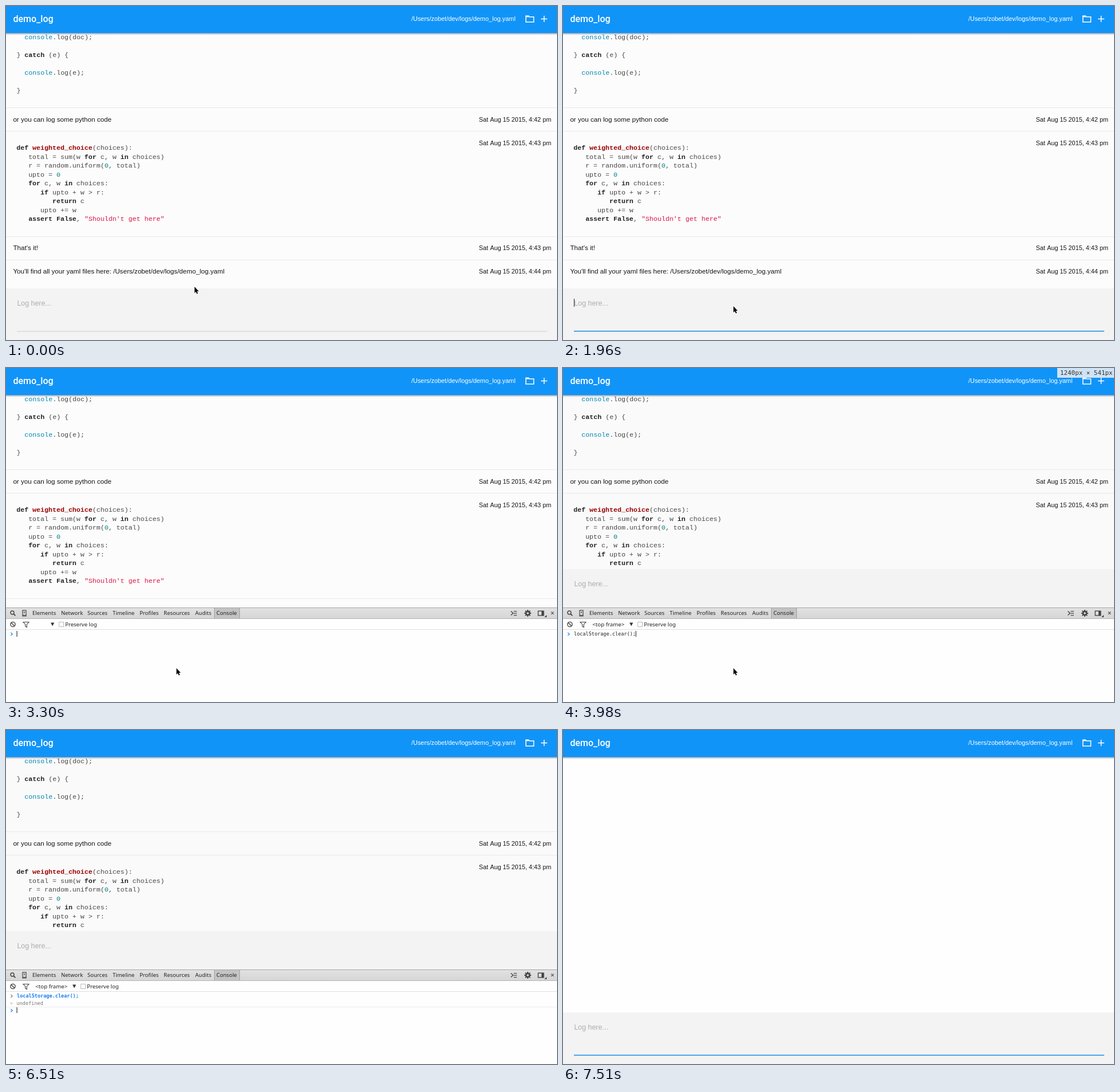
An HTML page with a canvas for the animation above (8 s loop, 961x583 px).

```html
<!DOCTYPE html>
<html lang="en">
<head>
<meta charset="utf-8">
<title>demo_log</title>
<style>
html, body { margin: 0; width: 100%; height: 100%; overflow: hidden; background: #fefefe; }
canvas { display: block; }
</style>
</head>
<body>
<canvas id="stage" width="961" height="583"></canvas>
<script>
const W = 961, H = 583, LOOP = 8000;
const ctx = document.getElementById('stage').getContext('2d');

const SANS = '"Liberation Sans", Arial, sans-serif';
const CODE = '"Liberation Mono", monospace';
const TOOLS = '"Noto Sans", sans-serif';
const TERM = '"DejaVu Sans Mono", monospace';
const BLUE = '#1194f8';
const PATH = '/Users/zobet/dev/logs/demo_log.yaml';

const between = (t, a, b) => t >= a && t < b;

// Last entry of [time, ...value] rows already reached.
function step(rows, t) {
  let hit = rows[0];
  for (const row of rows) if (t >= row[0]) hit = row;
  return hit;
}

function box(x, y, w, h, fill) {
  ctx.fillStyle = fill;
  ctx.fillRect(x, y, w, h);
}

function text(str, x, y, font, fill, align = 'left') {
  ctx.font = font;
  ctx.fillStyle = fill;
  ctx.textAlign = align;
  ctx.fillText(str, x, y);
}

function shape(points, { fill, stroke, width = 1, close = true }) {
  ctx.beginPath();
  points.forEach(([x, y], i) => i ? ctx.lineTo(x, y) : ctx.moveTo(x, y));
  if (close) ctx.closePath();
  if (stroke) {
    ctx.strokeStyle = stroke;
    ctx.lineWidth = width;
    ctx.stroke();
  }
  if (fill) {
    ctx.fillStyle = fill;
    ctx.fill();
  }
}

const line = (points, stroke, width) => shape(points, { stroke, width, close: false });

function ring(x, y, r, stroke, width) {
  ctx.beginPath();
  ctx.arc(x, y, r, 0, Math.PI * 2);
  ctx.strokeStyle = stroke;
  ctx.lineWidth = width;
  ctx.stroke();
}

// Syntax colouring: [pattern, colour, weight]
const RULES = [
  [/^".*"$/, '#dd1144', ''],
  [/^weighted_choice$/, '#990000', 'bold '],
  [/^console$/, '#0086b3', ''],
  [/^0$/, '#008080', ''],
  [/^(def|for|in|if|return|assert|False|catch)$/, '#222', 'bold ']
];

function codeLine(str, x, y) {
  for (const token of str.match(/"[^"]*"|\w+|[^\w"]+/g)) {
    const rule = RULES.find(r => r[0].test(token)) || [0, '#484848', ''];
    text(token, x, y, rule[2] + '11.63px ' + CODE, rule[1]);
    x += ctx.measureText(token).width;
  }
}

const SCRIPT = ['  console.log(doc);', '} catch (e) {', '  console.log(e);', '}'];
const PYTHON = [
  'def weighted_choice(choices):',
  '   total = sum(w for c, w in choices)',
  '   r = random.uniform(0, total)',
  '   upto = 0',
  '   for c, w in choices:',
  '      if upto + w > r:',
  '         return c',
  '      upto += w',
  '   assert False, "Shouldn\'t get here"'
];
const ROWS = [
  [201.5, '4:42', 'or you can log some python code'],
  [242.7, '4:43', ''],
  [426, '4:43', "That's it!"],
  [467.3, '4:44', "You'll find all your yaml files here: " + PATH]
];

function drawList(bg) {
  box(0, 47, W, H, bg);
  SCRIPT.forEach((s, i) => codeLine(s, 18.4, 58 + i * 31));
  PYTHON.forEach((s, i) => codeLine(s, 18.2, 251 + i * 15.54));
  for (const y of [177, 218, 402, 443]) box(0, y, W, 1, '#e9e9e9');
  for (const [y, time, msg] of ROWS) {
    text(msg, 12.4, y, '11.65px ' + SANS, '#151515');
    text(`Sat Aug 15 2015, ${time} pm`, 951, y, '10.87px ' + SANS, '#151515', 'right');
  }
}

function drawInput(top, focused, caret) {
  box(0, top, W, H - top, '#f3f3f3');
  text('Log here...', 19.4, top + 29.5, '12.4px ' + SANS, '#adadad');
  if (focused) box(19, top + 73.8, 925, 1.6, '#1b8fea');
  else box(19, top + 74.5, 925, 1, '#cbcbcb');
  if (caret) box(19, top + 18, 1, 14, '#222');
}

function drawHeader() {
  const fade = ctx.createLinearGradient(0, 47, 0, 51);
  fade.addColorStop(0, 'rgba(0,0,0,.32)');
  fade.addColorStop(1, 'rgba(0,0,0,0)');
  box(0, 47, W, 4, fade);
  box(0, 0, W, 47.4, BLUE);
  text('demo_log', 12.4, 28, '500 16px Roboto, sans-serif', '#fff');
  text(PATH, 707, 25.6, '10.9px ' + SANS, '#fff');
  // folder
  shape([[906.7, 17.3], [911.5, 17.3], [913, 18.9], [920.5, 18.9], [920.5, 28], [906.7, 28]],
    { stroke: '#fff', width: 1.5 });
  box(906.7, 17, 5.2, 2.4, '#fff');
  // plus
  box(933, 21.8, 11, 1.5, '#fff');
  box(937.8, 17, 1.5, 11, '#fff');
}

function drawSizeTip() {
  box(862, 0, 99, 17, '#d0e3f4');
  text('1240px × 541px', 867, 11.7, '10.87px ' + TERM, '#333');
}

const TABS = [['Elements', 46], ['Network', 96], ['Sources', 142], ['Timeline', 186],
  ['Profiles', 233], ['Resources', 275], ['Audits', 330], ['Console', 367]];

function drawToolbar() {
  const grad = ctx.createLinearGradient(0, 418, 0, 437);
  grad.addColorStop(0, '#e2e2e2');
  grad.addColorStop(1, '#d6d6d6');
  box(0, 418, W, 19, grad);
  box(0, 418, W, 1, '#a6a6a6');
  box(0, 437, W, 1, '#b4b4b4');
  box(363, 419, 45, 18, '#c3c3c3');
  box(363, 419, 1, 18, '#a2a2a2');
  box(407, 419, 1, 18, '#a2a2a2');
  for (const [name, x] of TABS) text(name, x, 431.3, '9.5px ' + TOOLS, '#222');

  const ink = '#444';
  ring(11, 427, 3, ink, 1.4);
  line([[13.2, 429.2], [16.3, 432.3]], ink, 1.9);
  ctx.strokeStyle = ink;
  ctx.lineWidth = 1.2;
  ctx.strokeRect(29, 423, 6, 10);
  box(31, 425, 2, 3, '#777');
  box(29, 431, 6, 1, ink);

  line([[880.5, 424.5], [884.5, 428], [880.5, 431.5]], ink, 1.4);
  for (const y of [424, 427.5, 431]) box(885.5, y, 5.5, 1.2, ink);
  for (let i = 0; i < 8; i++) {
    const a = i * Math.PI / 4, c = Math.cos(a), s = Math.sin(a);
    line([[910 + c * 3, 428 + s * 3], [910 + c * 6, 428 + s * 6]], ink, 2);
  }
  ring(910, 428, 3.1, ink, 2.5);
  ctx.lineWidth = 1.4;
  ctx.strokeRect(928.2, 424.2, 9.6, 7.8);
  box(934, 424, 4, 8, ink);
  shape([[943, 431], [943, 435], [939, 435]], { fill: ink });
  line([[950.8, 425.5], [955.4, 430.1]], '#555', 1.1);
  line([[955.4, 425.5], [950.8, 430.1]], '#555', 1.1);
}

function drawFilterBar(framed) {
  const dx = framed ? 38 : 0, ink = '#444';
  box(0, 456, W, 1, '#dedede');
  ring(12, 447.5, 4.1, ink, 1.4);
  line([[9.1, 444.6], [14.9, 450.4]], ink, 1.4);
  shape([[30, 443.5], [40, 443.5], [36.3, 447.5], [36.3, 452.5], [33.7, 451], [33.7, 447.5]],
    { stroke: ink, width: 1.1 });
  if (framed) text('<top frame>', 51.3, 450.6, '9.7px ' + TOOLS, '#222');
  shape([[78 + dx, 444.5], [84.2 + dx, 444.5], [81.1 + dx, 450.5]], { fill: '#333' });
  ctx.strokeStyle = '#bcbcbc';
  ctx.lineWidth = 1;
  ctx.strokeRect(92.5 + dx, 443.5, 8, 8);
  text('Preserve log', 103.2 + dx, 450.8, '9.5px ' + TOOLS, '#222');
}

const chevron = (y, color) =>
  line([[8.3, y - 2.6], [11.2, y], [8.3, y + 2.6]], color, 1.3);

function drawConsole(t) {
  const cmd = 'localStorage.clear();', font = '8.54px ' + TERM;
  const ran = t >= 4580, typed = t >= 3980;
  if (ran) {
    chevron(464.5, '#8b8b8b');
    text(cmd, 19, 467.2, 'bold ' + font, '#147fee');
    line([[10.2, 475], [8, 477], [10.2, 479]], '#aaa', 1);
    box(11, 476.5, 1.2, 1.2, '#aaa');
    text('undefined', 18.6, 479.7, font, '#777');
    box(0, 483, W, 1, '#ededed');
  } else if (typed) {
    text(cmd, 19, 467.2, font, '#222');
  }
  chevron(ran ? 489.7 : 464.5, '#2a8cf0');
  const hidden = t < 3300 || between(t, 4430, 4580) ||
    between(t, 5030, 5480) || between(t, 5930, 6380);
  if (!hidden) box(typed && !ran ? 126.6 : 18.5, ran ? 484 : 459, 1.1, 10, '#222');
}

function drawDevtools(t) {
  box(0, 418, W, H - 418, '#fefefe');
  drawToolbar();
  drawFilterBar(t >= 3620);
  drawConsole(t);
}

const POINTER = [
  [0, 328.8, 490], [450, 306, 512], [690, 297.3, 524],
  [5780, 340, 527], [5930, 520, 541], [6080, 720, 556],
  [6230, 870, 568], [6380, 939, 576]
];
const ARROW = [[0, 0], [0, 11], [2.5, 8.8], [4, 12.6], [5.9, 11.8], [4.3, 8.1], [7.4, 8.1]];

function drawPointer(t) {
  const [, x, y] = step(POINTER, t);
  shape(ARROW.map(([px, py]) => [x + px, y + py]), { fill: '#000', stroke: '#fff', width: 1.6 });
}

function draw(t) {
  const tools = between(t, 3120, 6820);
  const shrunk = between(t, 3440, 6820);
  const cleared = t >= 6820;
  const focused = between(t, 1240, 2850) || cleared;
  const caret = between(t, 960, 1510) || between(t, 1960, 2560) || between(t, 7120, 7510);

  if (cleared) box(0, 0, W, H, '#fefefe');
  else drawList(shrunk ? '#fafafa' : '#fcfcfc');
  if (shrunk || !tools) drawInput(shrunk ? 351 : 493, focused, caret);
  drawHeader();
  if (between(t, 3440, 4280)) drawSizeTip();
  if (tools) drawDevtools(t);
  if (t < 6510) drawPointer(t);
}

const start = performance.now();
function tick() {
  draw((performance.now() - start) % LOOP);
  requestAnimationFrame(tick);
}
tick();
</script>
</body>
</html>
```
